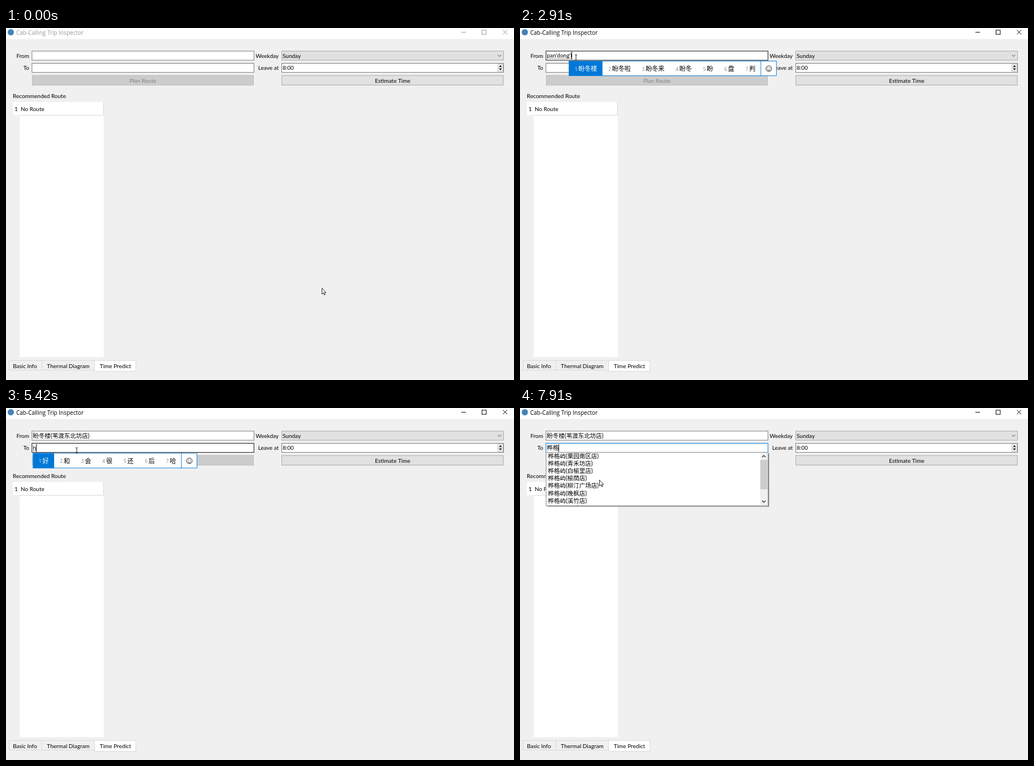
These frames come from a looping animation (898x623 px, 7990 ms). An HTML page with a canvas:

```html
<!DOCTYPE html>
<html lang="en">
<head>
<meta charset="utf-8">
<title>Trip planner</title>
<style>
html, body { margin: 0; width: 100%; height: 100%; overflow: hidden; background: #f0f0f0; }
canvas { display: block; }
</style>
</head>
<body>
<canvas id="stage" width="898" height="623"></canvas>
<script>
const ctx = document.getElementById('stage').getContext('2d');
const LOOP = 7990;
const CJK = '"Noto Sans CJK SC", "Noto Sans CJK", sans-serif';
const UI = '10px Lato, ' + CJK;
const NAME = '10.5px Lato, ' + CJK;
const BLUE = '#0078d7', HOVER = '#171717', EDGE = '#7a7a7a';
const ROW1 = 40.4, ROW2 = 62, ROW3 = 83.6, BOX_H = 17.1, BUTTON_H = 17.9;

const SHOP_A = '盼冬楼', SHOP_B = '桦格屿';
const CHOSEN = SHOP_A + '(苇渡东北坊店)';

// Each entry: start time, text, input-method candidates while composing
const fromText = [
  [0, ''],
  [1890, 'p', '盘 怕 跑 片 朋友 平 排'],
  [1970, 'pa', '怕 爬 啪 帕 趴 扒 琶'],
  [2130, 'pan', '盼 盘 判 攀 畔 叛 磐'],
  [2200, "pan'd", '盼到 判断 判定 盘点 攀到 盘底 盼'],
  [2280, "pan'do", '盼冬 盼懂 盘动 攀动 判懂 盼 盘'],
  [2350, "pan'don", '盼冬 盼懂 盘动 攀动 判懂 盼 盘'],
  [2430, "pan'dong", '盼冬 盼懂 盘动 攀动 判懂 盼东 盼'],
  [2910, "pan'dong'l", '盼冬楼 盼冬啦 盼冬来 盼冬 盼 盘 判'],
  [2980, "pan'dong'lo", '盼冬楼 盼冬 盼懂 盘动 盼 盘 判'],
  [3140, "pan'dong'lou", '盼冬楼 盼冬 盼懂 盘动 盼 盘 判'],
  [3290, SHOP_A],
  [4320, CHOSEN]
];
const toText = [
  [0, ''],
  [5420, 'h', '好 和 会 很 还 后 哈'],
  [5500, 'hu', '湖 虎 户 护 互 呼 胡'],
  [5570, 'hua', '桦 花 话 画 化 滑 哗'],
  [5650, "hua'g", '桦格 画个 花个 花果 画过 花瓜 话过'],
  [5730, "hua'ge", '桦格 画个 桦 花 话 画 化'],
  [6040, "hua'ge'y", '桦格屿 桦格 画个 桦 花 话 画'],
  [6120, "hua'ge'yu", '桦格屿 桦格 画个 桦 花 话 画'],
  [6420, SHOP_B],
  [6820, SHOP_B.slice(0, 2)]
];

const branches = (shop, list) => list.split(' ').map(b => `${shop}(${b}店)`);
const listA = branches(SHOP_A, '柳汀 苇渡东北坊 青石巷 榆荫 晚枫广场 白榆里 溪竹 南禾');
const listB = branches(SHOP_B, '栗园南区 青禾坊 白榆里 榆荫 柳汀广场 晚枫 溪竹 南禾');
const listLong = [...listB.slice(0, 3), SHOP_B + '随家送(榆荫餐厅)', ...listB.slice(3, 7)];

const borderFrom = [[0, EDGE], [550, HOVER], [3770, BLUE], [4480, EDGE]];
const borderTo = [[0, EDGE], [4400, HOVER], [7430, BLUE]];
const caretFrom = [[0, 0], [790, 1], [1350, 0], [1890, 1], [3460, 0], [3610, 1], [4080, 0]];
const caretTo = [[0, 0], [4480, 1], [5030, 0], [5420, 1], [6580, 0], [6730, 1], [7280, 0], [7510, 1]];

// Pointer stops: time, x, y, is text cursor
const pointer = [
  [630, 99, 51, 1], [1110, 99, 52, 1], [3770, 101, 68, 0], [4080, 108, 70, 0],
  [4160, 118, 72, 0], [4240, 126, 73, 0], [4400, 127, 73, 1], [4720, 126, 74, 1],
  [4800, 125, 75, 1], [6730, 124, 75, 0], [7750, 129, 88, 0], [7830, 137, 112, 0],
  [7910, 140.5, 127.5, 0]
];

const at = (track, t) => track.findLast(k => k[0] <= t);

function rect(x, y, w, h, fill, stroke) {
  ctx.fillStyle = fill;
  ctx.fillRect(x, y, w, h);
  if (stroke) {
    ctx.strokeStyle = stroke;
    ctx.lineWidth = 1;
    ctx.strokeRect(x + .5, y + .5, w - 1, h - 1);
  }
}

function text(s, x, y, { font = UI, color = '#000', align = 'left', drop = 3.5 } = {}) {
  ctx.font = font;
  ctx.fillStyle = color;
  ctx.textAlign = align;
  ctx.fillText(s, x, y + drop);
}

function path(points, color, width = 1) {
  ctx.beginPath();
  points.forEach(([x, y]) => ctx.lineTo(x, y));
  ctx.strokeStyle = color;
  ctx.lineWidth = width;
  ctx.stroke();
}

const chevron = (x, y, d, color = '#444', width = 1) =>
  path([[x - 3, y - d * 1.5], [x, y + d * 1.5], [x + 3, y - d * 1.5]], color, width);

function triangle(x, y, d) {
  ctx.beginPath();
  ctx.moveTo(x - 2.5, y - d);
  ctx.lineTo(x + 2.5, y - d);
  ctx.lineTo(x, y + d * 1.5);
  ctx.fillStyle = '#000';
  ctx.fill();
}

function titleBar(active) {
  const ink = active ? '#000' : '#999';
  rect(0, 0, 898, 19.4, '#fff');
  ctx.beginPath();
  ctx.arc(8.5, 7.5, 5.5, 0, 7);
  ctx.fillStyle = '#4583b8';
  ctx.fill();
  text('Cab-Calling Trip Inspector', 18, 8, { font: '10px "Open Sans", sans-serif', color: ink });
  path([[805, 7.5], [813, 7.5]], ink);
  ctx.strokeRect(841.5, 3.8, 7.4, 7.4);
  path([[878.4, 3.6], [886, 11.2]], ink);
  path([[886, 3.6], [878.4, 11.2]], ink);
}

function form() {
  text('From', 41, 49, { align: 'right' });
  text('To', 41, 70.5, { align: 'right' });
  text('Weekday', 482, 49, { align: 'right' });
  text('Leave at', 482, 70.5, { align: 'right' });

  rect(46, ROW3, 392, BUTTON_H, '#ccc', '#bfbfbf');
  text('Plan Route', 242, 93, { align: 'center', color: '#838383' });
  rect(487, ROW3, 392.6, BUTTON_H, '#e1e1e1', '#adadad');
  text('Estimate Time', 683.5, 93, { align: 'center' });

  rect(487, ROW1, 393, BOX_H, '#e1e1e1', '#adadad');
  text('Sunday', 489, 49);
  chevron(872.5, 49, 1);

  rect(487, ROW2, 393, BOX_H, '#fff', EDGE);
  text('8:00', 489, 70.5);
  rect(869, 63.6, 10, 7, '#f0f0f0', '#c4c4c4');
  rect(869, 70.4, 10, 7, '#f0f0f0', '#c4c4c4');
  triangle(874, 67.5, -1.2);
  triangle(874, 73, 1.2);
}

function routeTable() {
  text('Recommended Route', 12, 120.5);
  rect(12, 131, 12, 23, '#fff');
  rect(24.2, 131, 148.5, 451.4, '#fff');
  path([[24, 154.5], [172.3, 154.5], [172.3, 131]], '#d8d8d8');
  text('1', 18, 143, { align: 'center' });
  text('No Route', 26, 143);
}

function tabs() {
  rect(5, 588, 59, 18, '#f0f0f0', '#d9d9d9');
  rect(63, 588, 94, 18, '#f0f0f0', '#d9d9d9');
  rect(156, 588, 74, 20, '#fff', '#dcdcdc');
  text('Basic Info', 33.5, 598, { align: 'center' });
  text('Thermal Diagram', 110, 598, { align: 'center' });
  text('Time Predict', 193.5, 598, { align: 'center' });
}

// Draws an edit box and returns the caret position
function editBox(y, value, composing, border, caretOn) {
  rect(45.4, y, 393.4, BOX_H, '#fff', border);
  const font = composing ? UI : NAME;
  text(value, 47.5, y + 8.5, { font, drop: composing ? 3.5 : 3.8 });
  const end = 47.5 + ctx.measureText(value).width;
  if (composing) {
    ctx.setLineDash([1, 1]);
    path([[48, y + 13.5], [end, y + 13.5]], '#333');
    ctx.setLineDash([]);
  }
  if (caretOn) rect(Math.floor(end), Math.floor(y) + 2, 1, 13.5, '#000');
  return end;
}

function candidateBar(caret, y, words) {
  const left = caret - 5.5, h = 27, mid = y + h / 2 + .5;
  const cell = w => 26.5 + 11 * w.length;
  const total = words.reduce((sum, w) => sum + cell(w), 0);
  rect(left, y, total + 28, h, '#fff');
  let x = left;
  words.forEach((w, i) => {
    if (!i) rect(x, y, cell(w), h, BLUE);
    text(i + 1, x + 10.5, mid, { font: '8px "Noto Sans", sans-serif', color: i ? '#888' : '#cfe4fa' });
    text(w, x + 17, mid, { font: '11px ' + CJK, color: i ? '#000' : '#fff', drop: 4 });
    x += cell(w);
  });
  ctx.strokeStyle = '#1880d4';
  ctx.lineWidth = 1;
  ctx.strokeRect(left + .5, y + .5, total + 27, h - 1);
  path([[x, y], [x, y + h]], '#1880d4');

  const cx = x + 14;
  ctx.strokeStyle = '#222';
  ctx.beginPath();
  ctx.arc(cx, mid, 5, 0, 7);
  ctx.stroke();
  ctx.beginPath();
  ctx.arc(cx, mid + .3, 2.7, .3, Math.PI - .3);
  ctx.stroke();
  rect(cx - 2.4, mid - 2, 1.3, 1.3, '#222');
  rect(cx + 1.1, mid - 2, 1.3, 1.3, '#222');
}

function dropList(y, items, thumb, picked) {
  rect(49, y + 3, 392, 94, 'rgba(0,0,0,.15)');
  rect(48, y + 2, 392, 94.5, 'rgba(0,0,0,.4)');
  rect(45.6, y, 393.2, 95.5, '#fff', '#858585');
  ctx.save();
  ctx.beginPath();
  ctx.rect(47, y + 1, 391, 93.5);
  ctx.clip();
  items.forEach((s, i) => {
    const mid = y + 7 + 13.15 * i;
    if (i === picked) rect(47, mid - 6.5, 378, 13, BLUE);
    text(s, 49.5, mid, { font: NAME, color: i === picked ? '#fff' : '#000', drop: 3.8 });
  });
  rect(424.6, y + 1, 13.4, 93.5, '#f0f0f0');
  rect(424.8, y + 14, 12.6, thumb, '#cdcdcd');
  chevron(431, y + 7.5, -1, '#333', 1.4);
  chevron(431, y + 87.5, 1, '#333', 1.4);
  ctx.restore();
}

function drawPointer(t) {
  let [, x, y, beam] = at(pointer, t) || [0, 558.5, 460.5, 0];
  if (t >= 70 && t < 630) {
    const p = (Math.floor((t - 70) / 80) + 1) / 8;
    const e = p * p * (3 - 2 * p);
    x += (99 - x) * e;
    y += (51 - y) * e;
    beam = y < 57;
  }
  if (beam) {
    path([[x, y - 4.5], [x, y + 4.5]], '#222');
    path([[x - 2, y - 4.5], [x + 2, y - 4.5]], '#444');
    path([[x - 2, y + 4.5], [x + 2, y + 4.5]], '#444');
    return;
  }
  ctx.beginPath();
  [[0, 0], [0, 10.5], [2.5, 8.3], [4.2, 12], [5.7, 11.3], [4.1, 7.8], [7.2, 7.8]]
    .forEach(([dx, dy]) => ctx.lineTo(x + dx, y + dy));
  ctx.closePath();
  ctx.fillStyle = '#fff';
  ctx.fill();
  ctx.strokeStyle = '#111';
  ctx.lineWidth = .9;
  ctx.stroke();
}

function draw(t) {
  rect(0, 0, 898, 623, '#f0f0f0');
  titleBar(t >= 790);
  form();
  routeTable();
  tabs();

  const [, a, wordsA] = at(fromText, t);
  const [, b, wordsB] = at(toText, t);
  const endA = editBox(ROW1, a, wordsA, at(borderFrom, t)[1], at(caretFrom, t)[1]);
  const endB = editBox(ROW2, b, wordsB, at(borderTo, t)[1], at(caretTo, t)[1]);
  if (wordsA) candidateBar(endA, 58, wordsA.split(' '));
  if (wordsB) candidateBar(endB, 79.6, wordsB.split(' '));

  if (t >= 3610 && t < 4320) dropList(56.6, listA, 52, t >= 4240 ? 1 : -1);
  if (t >= 6730) {
    const long = t >= 6820 && t < 6900;
    dropList(78, long ? listLong : listB, long ? 58 : 52, -1);
  }
  drawPointer(t);
}

function tick() {
  draw(performance.now() % LOOP);
  requestAnimationFrame(tick);
}
tick();
</script>
</body>
</html>
```
